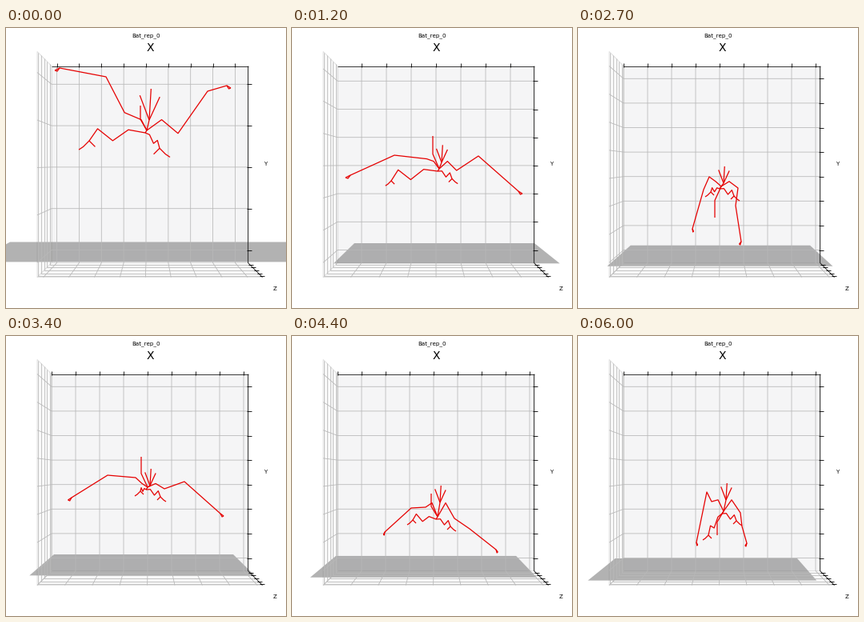
A matplotlib script for the animation above (6.1 s loop, 350 by 350 pixels).

```python
import numpy as np
import matplotlib.pyplot as plt
from matplotlib.animation import FuncAnimation
from matplotlib.collections import LineCollection
from matplotlib.patches import Polygon

SIZE, FRAMES, INTERVAL = 350, 61, 100
CENTER = np.array([179.5, 170.5])
LEFT, RIGHT, TOP, BOTTOM = 57, 302.5, 47.5, 293.5
DEPTH, GROUND_DEPTH = 1.147, 1.257     # size of the near side relative to the far side
DEPTH_TICKS = 1 + (DEPTH - 1) * np.linspace(.12, .92, 5)

# Key poses: time, body, neck height, tail drop,
# then wrist and tip of the left wing, of the right wing, and the left foot
POSES = [
    (0, (176, 128), 13, -31, (125, 61), (67, 50), (252, 79), (276, 72), (104, 141)),
    (1200, (184, 176), 8, -41, (128, 159), (73, 184), (233, 160), (283, 204), (124, 191)),
    (2700, (179, 198), 4, 39, (157, 202), (143, 251), (197, 222), (204, 267), (166, 205)),
    (3400, (177, 189), 2, -38, (127, 174), (82, 202), (223, 182), (268, 222), (168, 194)),
    (4400, (182, 226), 18, -29, (149, 215), (116, 245), (222, 241), (255, 267), (151, 230)),
    (5200, (182, 226), 15, -8, (131, 172), (70, 171), (232, 193), (280, 198), (156, 250)),
    (6000, (182, 219), 14, 30, (161, 195), (148, 258), (205, 238), (211, 259), (163, 249)),
]
times = np.array([p[0] for p in POSES], float)
keys = np.array([np.hstack(p[1:]) for p in POSES], float)
slopes = np.gradient(keys, times, axis=0) * .6


def pose_at(t):
    """Cubic Hermite blend of the key poses."""
    i = min(np.searchsorted(times, t, side="right") - 1, len(times) - 2)
    h = times[i + 1] - times[i]
    u = (t - times[i]) / h
    ease = u * u * (3 - 2 * u)
    return (keys[i] + ease * (keys[i + 1] - keys[i])
            + h * u * (1 - u) * ((1 - u) * slopes[i] - u * slopes[i + 1]))


def unit_at(t):
    """Pixels per data unit along x."""
    return np.interp(t, [0, 1200, 2100], [55.7, 31, 30])


def wing(body, shoulder, elbow, wrist, tip, side):
    # Fingers point outwards when the wing is spread, inwards when it is folded
    curl = side * (abs(tip[0] - body[0]) / 10 - 5)
    finger = tip + (curl, 3)
    return [[body, shoulder, elbow, wrist, tip, finger], [tip, tip + (curl / 2, 4), finger]]


def leg(hip, foot, side, zoom):
    """Zigzag from hip to foot, ending in a heel and a bent toe."""
    bend = 3 + .15 * np.hypot(*(foot - hip))
    joints = [hip + f * (foot - hip) + (0, k * bend)
              for f, k in [(.3, -.5), (.58, .3), (.85, -1)]]
    heel, toe, claw = [foot + zoom * np.array([side * dx, dy])
                       for dx, dy in [(-4, 4), (4, 4), (7, 6)]]
    return [[hip, *joints, foot, heel], [foot, toe, claw]]


def bat_lines(t):
    p = pose_at(t)
    zoom = unit_at(t) / 30
    neck_height, tail_drop = p[2:4]
    body = p[:2]
    l_wrist, l_tip, r_wrist, r_tip, l_foot = p[4:].reshape(5, 2)

    def at(dx, dy, scale=1):
        return body + scale * np.array([dx, dy])

    neck, hip = at(3, -neck_height), at(-2, 3)
    lift = 3 + .8 * neck_height
    rays = [neck + 21 * zoom * np.array(d) for d in [(.06, -1), (-.3, -.79), (.34, -.74)]]
    lines = [[neck, ray] for ray in rays]
    lines += [[neck, body, hip], [body, at(-8, .45 * tail_drop), at(-8, tail_drop)]]
    lines += wing(body, at(-7, -lift), at(-15, -12, zoom), l_wrist, l_tip, -1)
    lines += wing(body, at(10 * zoom, -lift), at(21, 2, zoom), r_wrist, r_tip, 1)
    lines += leg(hip, l_foot, -1, zoom)
    lines += leg(hip, at(16, 12 * zoom), 1, zoom)
    return lines


def near(x, y, scale=DEPTH):
    return tuple(CENTER + scale * (np.array([x, y]) - CENTER))


def ground_corners(t):
    stops = [0, 1200, 3400, 6000]
    left = np.interp(t, stops, [5, 78, 60, 46.5])
    right = np.interp(t, stops, [409, 303, 284, 274])
    y = np.interp(t, stops, [267.5, 269, 273, 278])
    return [(left, y), (right, y), near(right, y, GROUND_DEPTH), near(left, y, GROUND_DEPTH)]


def ticks(anchor, step, low, high):
    k = np.arange(np.ceil((low - anchor) / step), np.floor((high - anchor) / step) + 1)
    return anchor + k * step


def axis_ticks(t):
    stops = [0, 1200, 2100]
    unit = unit_at(t)
    step = unit / 2 if unit / 2 > 27.2 else unit
    xs = ticks(np.interp(t, stops, [175, 180, 177]), step, LEFT, RIGHT)
    ys = ticks(277.5, np.interp(t, stops, [51.8, 35.2, 30.6]), TOP, BOTTOM)
    return xs, ys


def grid_lines(xs, ys):
    lines = [[(x, TOP), (x, BOTTOM), near(x, BOTTOM)] for x in xs]
    lines += [[near(LEFT, y), (LEFT, y), (RIGHT, y)] for y in ys]
    lines += [[near(LEFT, TOP, s), near(LEFT, BOTTOM, s), near(RIGHT, BOTTOM, s)]
              for s in DEPTH_TICKS]
    return lines


def tick_marks(xs, ys):
    marks = [[(x, TOP - 4), (x, TOP + 1.5)] for x in xs]
    starts = [(RIGHT, y) for y in ys] + [near(RIGHT, BOTTOM, s) for s in DEPTH_TICKS]
    return marks + [[(x - 2, y), (x + 4, y)] for x, y in starts]


def px(width):
    return width * .72


fig = plt.figure(figsize=(3.5, 3.5), dpi=100, facecolor="white")
ax = fig.add_axes([0, 0, 1, 1])
ax.set(xlim=(0, SIZE), ylim=(SIZE, 0))
ax.axis("off")

far = [(LEFT, TOP), (RIGHT, TOP), (RIGHT, BOTTOM), (LEFT, BOTTOM)]
panes = [([far[0], far[3], near(*far[3]), near(*far[0])], "#f9f9f9"),
         (far, "#f5f5f6"),
         ([far[3], far[2], near(*far[2]), near(*far[3])], "#f8f8f8")]
for corners, color in panes:
    ax.add_patch(Polygon(corners, facecolor=color, edgecolor="#dcdcdc", lw=px(.8)))


def add_lines(color, width):
    return ax.add_collection(LineCollection([], colors=color, linewidths=px(width)))


grid = add_lines("#b8b8b8", .8)
ground = ax.add_patch(Polygon([(0, 0)] * 3, facecolor="#808080", alpha=.6, lw=0))
edges = add_lines("#202020", .85)
edges.set_segments([far[:2], [far[1], far[2], near(*far[2])]])
marks = add_lines("black", .85)
bat = add_lines("#e60000", 1.25)

for x, y, label, size in [(175, 10, "Bat_rep_0", 5.1), (180, 25, "X", 10),
                          (324.5, 170, "Y", 5), (336.5, 326, "Z", 5)]:
    ax.text(x, y, label, size=size, ha="center", va="center", family="DejaVu Sans")


def draw(frame):
    t = frame * INTERVAL
    xs, ys = axis_ticks(t)
    grid.set_segments(grid_lines(xs, ys))
    marks.set_segments(tick_marks(xs, ys))
    ground.set_xy(ground_corners(t))
    bat.set_segments(bat_lines(t))
    return grid, ground, marks, bat


anim = FuncAnimation(fig, draw, frames=FRAMES, interval=INTERVAL, repeat=True, repeat_delay=0)
plt.show()
```
